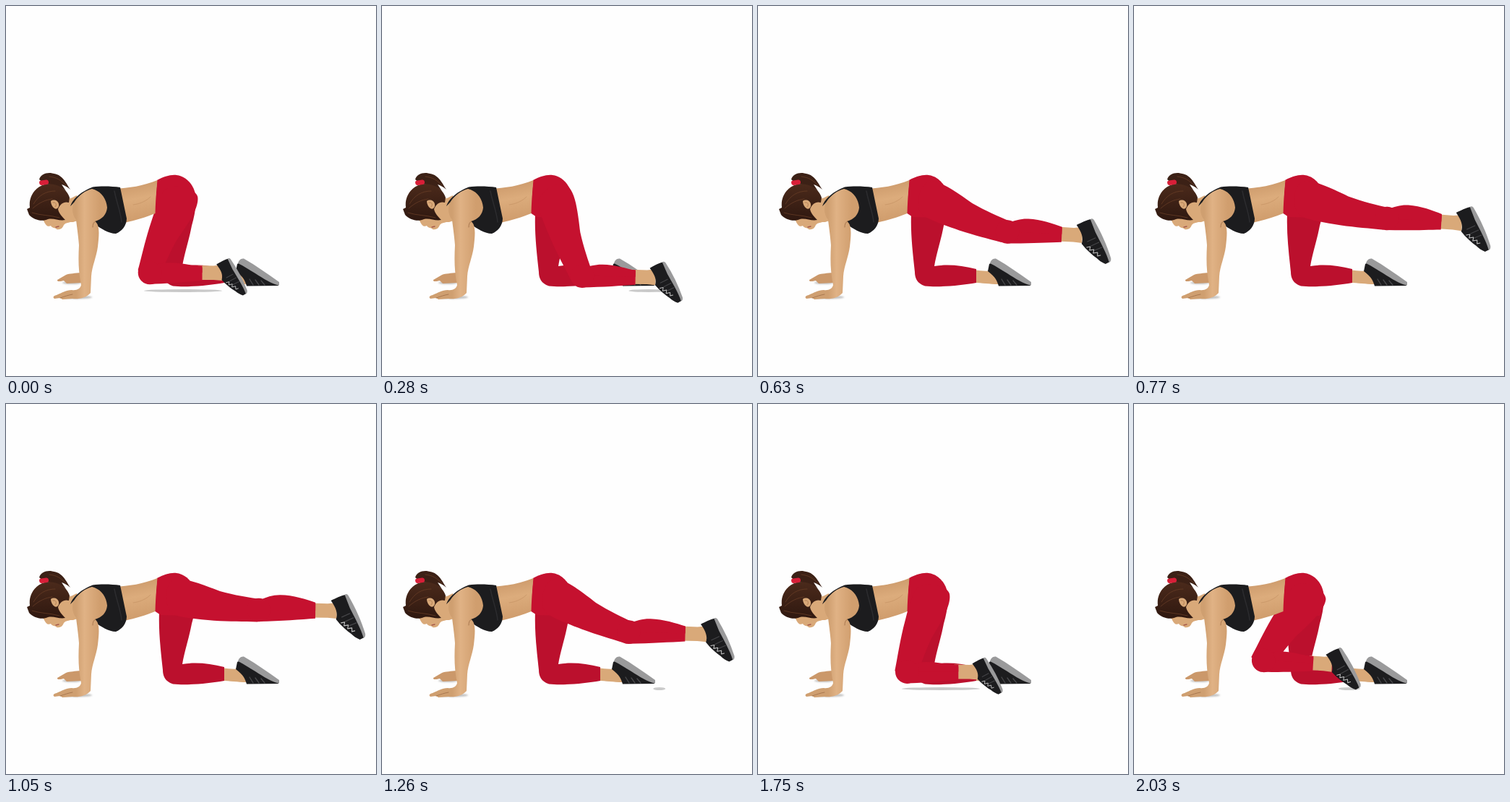
These frames come from a looping animation (512x512 px, 2100 ms). An HTML page without scripts:

```html
<!DOCTYPE html>
<html lang="en">
<head>
<meta charset="utf-8">
<title>Kneeling leg extension</title>
<style>
html, body { margin: 0; width: 100%; height: 100%; overflow: hidden; background: #fefefe; }
svg { display: block; width: 100vw; height: 100vh; }

/* a, b, c: thigh, shin and foot angles; l: thigh length; s: shin length;
   f: foot size; k: calf fullness; x, w: floor shadow place and half width */
@property --a { syntax: "<angle>"; inherits: true; initial-value: 22.1deg; }
@property --b { syntax: "<angle>"; inherits: true; initial-value: -90deg; }
@property --c { syntax: "<angle>"; inherits: true; initial-value: -4deg; }
@property --l { syntax: "<length>"; inherits: true; initial-value: 109px; }
@property --s { syntax: "<number>"; inherits: true; initial-value: .98; }
@property --f { syntax: "<number>"; inherits: true; initial-value: .84; }
@property --k { syntax: "<number>"; inherits: true; initial-value: .65; }
@property --x { syntax: "<length>"; inherits: true; initial-value: 245px; }
@property --w { syntax: "<number>"; inherits: true; initial-value: 54; }

.pose { animation: kick 2100ms -5ms infinite; }
.thigh { transform: translate(240px, 268px) rotate(var(--a)); }
.shin { transform: translateY(var(--l)) rotate(calc(var(--b) - var(--a))); }
.long { transform: scaleY(var(--s)); }
.calf { transform: scaleX(var(--k)); }
.foot { transform: translateY(calc(100px * var(--s))) rotate(calc(var(--c) - var(--b))) scale(var(--f)); }
.floor { transform: translate(var(--x), 394px) scaleX(var(--w)); }

@keyframes kick {
  0% { --a: 22.1deg; --l: 109px; --b: -90deg; --s: .98; --c: -4deg; --f: .84; --k: .65; --x: 245px; --w: 54;
    animation-timing-function: steps(7, end); }
  23.3333% { --a: -50.3deg; --l: 114px; --b: -88.3deg; --s: 1.01; --c: -1deg; --f: .98; --k: .88; --x: 462px; --w: 8;
    animation-timing-function: steps(2, end); }
  30% { --a: -67deg; --l: 114px; --b: -87.5deg; --s: 1.02; --c: 0deg; --f: 1; --k: .92; --x: 470px; --w: 0;
    animation-timing-function: steps(2, end); }
  36.6667% { --a: -76.7deg; --l: 113px; --b: -86.6deg; --s: 1.02; --c: 0deg; --f: 1; --k: .96; --x: 470px; --w: 0;
    animation-timing-function: steps(2, end); }
  43.3333% { --a: -82deg; --l: 111px; --b: -89deg; --s: 1.06; --c: 0deg; --f: 1; --k: 1; --x: 470px; --w: 0;
    animation-timing-function: steps(2, end); }
  50% { --a: -81.2deg; --l: 111px; --b: -89.5deg; --s: 1.06; --c: 0deg; --f: 1; --k: 1; --x: 470px; --w: 0;
    animation-timing-function: steps(2, end); }
  56.6667% { --a: -76.2deg; --l: 112px; --b: -88.6deg; --s: 1.06; --c: 0deg; --f: 1; --k: .97; --x: 400px; --w: 0;
    animation-timing-function: steps(4, end); }
  70% { --a: -30.7deg; --l: 112px; --b: -88.6deg; --s: 1.05; --c: -3deg; --f: .87; --k: .75; --x: 335px; --w: 34;
    animation-timing-function: steps(4, end); }
  83.3333% { --a: 18.2deg; --l: 108px; --b: -90deg; --s: .96; --c: -4deg; --f: .83; --k: .65; --x: 253px; --w: 54;
    animation-timing-function: steps(2, end); }
  90% { --a: 31deg; --l: 107px; --b: -88deg; --s: .94; --c: -4deg; --f: .9; --k: .65; --x: 280px; --w: 32;
    animation-timing-function: steps(2, end); }
  96.6667% { --a: 35deg; --l: 106px; --b: -87deg; --s: .93; --c: -4deg; --f: .95; --k: .65; --x: 298px; --w: 15;
    animation-timing-function: steps(1, end); }
  100% { --a: 22.1deg; --l: 109px; --b: -90deg; --s: .98; --c: -4deg; --f: .84; --k: .65; --x: 245px; --w: 54; }
}

.red { fill: #c5112f; }
.far { fill: #bb102d; }
.skin { fill: #d9a979; }
.dim { fill: #cb986a; }
.black { fill: #1c1c1e; }
.sole { fill: #9a9a9b; }
.hair { fill: #3c2116; }
.line { fill: none; stroke-linecap: round; stroke-linejoin: round; }
</style>
</head>
<body>
<svg viewBox="0 0 512 512">
  <defs>
    <linearGradient id="arm" gradientUnits="userSpaceOnUse" x1="97" y1="0" x2="130" y2="0">
      <stop offset="0" stop-color="#cf9f70"/>
      <stop offset=".35" stop-color="#e0b285"/>
      <stop offset="1" stop-color="#d09e6e"/>
    </linearGradient>
    <linearGradient id="waist" gradientUnits="userSpaceOnUse" x1="180" y1="245" x2="190" y2="298">
      <stop offset="0" stop-color="#cd9b6c"/>
      <stop offset=".4" stop-color="#dcac7c"/>
      <stop offset="1" stop-color="#ce9b6b"/>
    </linearGradient>
    <linearGradient id="mane" x1="0" y1="0" x2="0" y2="1">
      <stop offset="0" stop-color="#4b2a1b"/>
      <stop offset="1" stop-color="#2f1810"/>
    </linearGradient>
    <filter id="soft" x="-20%" y="-150%" width="140%" height="400%"><feGaussianBlur stdDeviation="1.2"/></filter>
  </defs>
  <rect width="512" height="512" fill="#fefefe"/>

  <!-- hand shadows -->
  <g fill="#8d8d8d" opacity=".6" filter="url(#soft)">
    <ellipse cx="98" cy="403" rx="21" ry="2.2"/>
    <ellipse cx="91" cy="383" rx="13" ry="1.8"/>
  </g>

  <!-- far hand -->
  <path class="dim" d="M104 369C95 370 88 370 83 372L71 379C70 382 76 381 80 380L84 384L104 383Z"/>

  <g class="pose">
    <g class="floor"><ellipse rx="1" ry="2" fill="#b4b4b4" opacity=".7"/></g>

    <!-- far foot -->
    <path class="skin" d="M299 365C310 367 318 367 326 366L333 385C320 385 310 383 299 383Z"/>
    <path class="black" d="M320 357L328 353L350 366L374 381L377 387L333 387.500C331 381 329 375 318 367Z"/>
    <path class="sole" d="M321 356C322 352 325 349 329 349.500C346 359 362 371 378 382L378 386.500C368 385 356 377 345 370C336 365 330 360 321 356Z"/>
    <path class="line" d="M337 378l5 8M345 379l5 7M353 380l5 6" stroke="#49494c" stroke-width="1.3"/>

    <!-- hips and far leg -->
    <path class="far" d="M220 262L262 262C264 275 261 290 257 304C253 325 247 342 244 360C262 357 282 359 302 364L302 383C280 387 250 389.500 231 387.500C220 384 217 376 217 368C214 340 211 315 212 288Z"/>
    <path class="red" d="M209 241C218 236 228 233 236 234C250 236 259 247 262 260C264 272 261 284 257 293L214 292L205 286Z"/>

    <!-- near leg -->
    <g class="thigh">
      <path class="red" d="M-25 0C-27 15-25 35-24 52C-22 75-19 92-16.500 112L15 112C15 95 15 75 17.500 54C20 42 23 30 25 14C26 4 26-6 22-13C14-24-22-20-25 0Z"/>
      <g class="shin">
        <g class="long">
          <path class="skin" d="M-10 68L-10 90L-11 102L11 102L9.500 90L10 68Z"/>
          <path class="red" d="M-16 0C-15 30-12.500 55-11 74L9.500 74L13 0Z"/>
          <path class="red calf" d="M0-4L13 0C18 10 21 18 21 28C21 45 15 62 11 74L0 74Z"/>
        </g>
        <circle class="red" r="16.300"/>
        <g class="foot">
          <path class="black" d="M-6-14C0-17 8-21 14-22L38 30L40 37L34 40C29 38 25 35 22 32C16 28 10 22 6 18L1 12C4 4 1-4-6-14Z"/>
          <path class="sole" d="M13-22Q16-24 18-21C28-4 36 14 41.500 32Q42 37 39 37.500C36 26 26 8 20-4Z"/>
          <path class="line" d="M8 17l5-1l-1 5l6-1l-1 5l6-1l0 5l4-1" stroke="#c4c4c4" stroke-width="1.100"/>
          <path class="line" d="M9 9l11-5M14 15l11-5M19 21l10-4" stroke="#454548" stroke-width="1.200"/>
        </g>
      </g>
    </g>
  </g>

  <!-- torso -->
  <path fill="url(#waist)" d="M150 253C170 252 190 249 209.500 241C208 255 207 270 206.500 287C192 293 180 296 164 300L140 300Z"/>
  <path class="line" d="M176 275C185 274 194 270 200 264" stroke="#bd8a5d" stroke-width="1" opacity=".5"/>

  <!-- neck and face -->
  <path class="skin" d="M72 268L90 266L98 262L103 296L96 298C92 300 88 298 82 300Z"/>
  <path class="skin" d="M44 288C50 293 52 297 54 301C57 306 60 305 62 304C64 308 68 306 70 309C75 310 78 308 80 303C83 299 89 300 94 297L88 272L64 266Z"/>
  <path class="line" d="M69 306L73 305" stroke="#a65a4b" stroke-width="1.300"/>

  <!-- hair -->
  <path class="hair" d="M46 240C48 233 56 230 64 231.500C78 233 82 243 89 254C84 250 81 248 77 247L83 256C75 249 63 247 53 246Z"/>
  <path fill="url(#mane)" d="M33 279C31 264 40 251 53 247C68 244 84 252 88 265L87 272C80 270 75 274 72 281C73 287 78 292 82 296C74 298 66 293 58 295C50 299 38 296 32 289L29 281Z"/>
  <path class="line" d="M38 274C45 262 55 256 68 256M37 280C46 272 55 268 64 267M36 286C48 290 60 289 74 293M60 236C70 237 76 241 83 248" stroke="#6d4029" stroke-width="1" opacity=".7"/>
  <path class="skin" d="M62 270C66 267 72 269 73 274C74 279 70 282 67 280C64 278 62 274 62 270Z"/>
  <path class="line" d="M65 272C69 271 71 275 68 278" stroke="#b57f54" stroke-width="1"/>
  <rect x="46" y="241" width="13" height="6.500" rx="3" fill="#d81f38" transform="rotate(-8 52 244)"/>

  <!-- top -->
  <path class="black" d="M89 277C93 265 106 256 120 250.500C132 249 147 249.500 158 251C161 265 164 280 167 294C167 304 160 312 152 315C142 315 132 308 121 301L120 265L94 272Z"/>
  <path class="line" d="M150 256C153 272 159 286 160 299" stroke="#333336" stroke-width="1.500" opacity=".7"/>

  <!-- near arm -->
  <path fill="url(#arm)" d="M93 274C98 264 108 256 119 253C131 256 139 266 140 279C139 289 133 295 123 298C130 302 129 316 127 333C125 348 119 360 118 374L117 397C111 404 101 406 92 405L78 406L75 404L67 405C64 403 66 401 70 400C77 397 83 393 91 393C98 394 103 391 104 386C100 367 100 350 101 331C100 317 98 305 97 296C92 290 91 281 93 274Z"/>
  <path class="line" d="M75 404C81 402 86 400 92 399M124 298C121 299 120 302 120 306" stroke="#a97850" stroke-width="1"/>
</svg>
</body>
</html>
```
